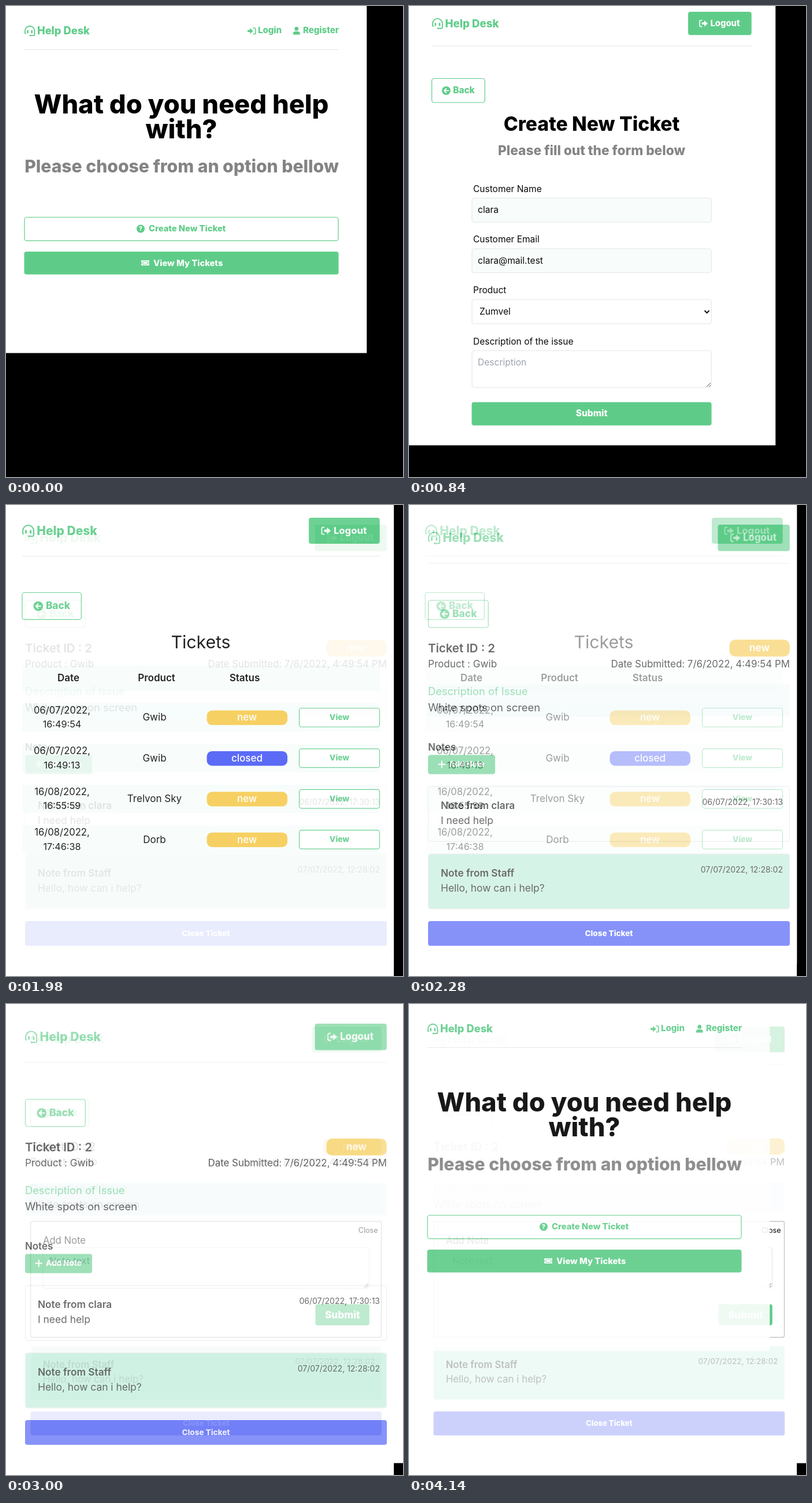
An HTML page for the animation above (4.2 s loop, 687 px wide and 815 px high).

```html
<!DOCTYPE html>
<html lang="en">
<head>
<meta charset="utf-8">
<title>Help Desk</title>
<style>
html, body { margin: 0; width: 100%; height: 100%; overflow: hidden; background: #000; }
#stage { display: block; font-family: Inter, sans-serif; font-optical-sizing: none; }
</style>
</head>
<body>
<svg id="stage" width="687" height="815" viewBox="0 0 687 815"></svg>
<script>
const GREEN = '#5ecc88', BLUE = '#374bf5', YELLOW = '#f6cb50', INK = '#0a0a0a';
const GREY = '#848484', LINE = '#e4e6e8', MINT = '#f8fdfc', HINT = '#9ca3af';
const BOLD = 800, SEMI = 600;

const text = (s, x, y, size, weight = 400, fill = INK, anchor = 'start') =>
  `<text x="${x}" y="${y}" font-size="${size}" font-weight="${weight}" fill="${fill}" text-anchor="${anchor}">${s}</text>`;
const centred = (s, x, y, size, weight, fill) => text(s, x, y, size, weight, fill, 'middle');
const box = (x, y, w, h, fill, stroke = 'none', r = 4, line = 1.2) =>
  `<rect x="${x}" y="${y}" width="${w}" height="${h}" rx="${r}" fill="${fill}" stroke="${stroke}" stroke-width="${line}"/>`;
const rule = (x, y, w) => box(x, y, w, 1, LINE, 'none', 0);
const grip = (x, y) =>
  `<path d="M${x - 7} ${y}l7-7M${x - 3} ${y}l3-3" stroke="#555" fill="none"/>`;

// Icons live in a 16 unit square; c is the colour, b the colour behind.
const ICONS = {
  headset: c => `<g fill="none" stroke="${c}" stroke-width="1.6"><path d="M2.4 12H1.6Q.8 12 .8 11V8a7.2 7.2 0 0 1 14.4 0v5.4q0 1.8-1.8 1.8H9"/>
    <path d="M4.9 7v4.6M11.1 7v4.6" stroke-width="2.2"/></g><circle cx="8.7" cy="15.1" r="1.2" fill="${c}"/>`,
  login: c => `<path d="M0 6h4.5V2.4L10.5 8l-6 5.6V10H0z" fill="${c}"/>
    <path d="M10.5 2.2h2.6q2 0 2 2v7.6q0 2-2 2h-2.6" fill="none" stroke="${c}" stroke-width="1.8"/>`,
  logout: c => `<path d="M5 6h4.5V2.4L16 8l-6.5 5.6V10H5z" fill="${c}"/>
    <path d="M5.5 2.2H3q-2 0-2 2v7.6q0 2 2 2h2.5" fill="none" stroke="${c}" stroke-width="1.8"/>`,
  user: c => `<circle cx="8" cy="4" r="4" fill="${c}"/><path d="M1 16v-2a4.5 4.5 0 0 1 4.5-4.5h5A4.5 4.5 0 0 1 15 14v2z" fill="${c}"/>`,
  help: (c, b) => `<circle cx="8" cy="8" r="8" fill="${c}"/>` + centred('?', 8, 12.4, 12.5, BOLD, b),
  ticket: (c, b) => box(0, 2.8, 16, 10.4, c, 'none', 1.4) + box(3.2, 5.2, 9.6, 5.6, c, b, .5, 1) +
    `<circle cx="0" cy="8" r="1.4" fill="${b}"/><circle cx="16" cy="8" r="1.4" fill="${b}"/>`,
  back: (c, b) => `<circle cx="8" cy="8" r="8" fill="${c}"/>
    <path d="M13 8H4.5M8.4 3.8L4.2 8l4.2 4.2" fill="none" stroke="${b}" stroke-width="2"/>`,
  plus: c => `<path d="M8 1v14M1 8h14" stroke="${c}" stroke-width="2.6" stroke-linecap="round"/>`
};
const icon = (name, x, y, size, color = GREEN, behind = '#fff') =>
  `<g transform="translate(${x} ${y}) scale(${size / 16})">${ICONS[name](color, behind)}</g>`;

const logo = (x, base, size) =>
  icon('headset', x, base - size * .83, size) + text('Help Desk', x + size * 1.2, base, size, BOLD, GREEN);
const logout = (x, y, w, h) => box(x, y, w, h, GREEN) +
  icon('logout', x + w * .174, y + h * .5 - w * .068, w * .137, '#fff') +
  text('Logout', x + w * .35, y + h * .615, w / 7.4, BOLD, '#fff');
const back = (x, y, w, h) => box(x, y, w, h, '#fff', GREEN) +
  icon('back', x + w * .19, y + h * .5 - w * .08, w * .163) +
  text('Back', x + w * .4, y + h * .61, w * .168, BOLD, GREEN);

function home() {
  return logo(32, 49, 18.3) +
    icon('login', 418, 36, 14.5) + text('Login', 436, 47.2, 15, BOLD, GREEN) +
    icon('user', 496, 36, 13.5) + text('Register', 514, 47.2, 15, BOLD, GREEN) +
    rule(32, 75, 544) +
    centred('What do you need help', 303.5, 186, 45.2, BOLD, '#000') +
    centred('with?', 303.5, 229, 45.2, BOLD, '#000') +
    centred('Please choose from an option bellow', 304, 288, 30.1, BOLD, GREY) +
    box(32, 365.5, 543, 40.7, '#fff', GREEN) +
    icon('help', 226, 378.5, 14) + text('Create New Ticket', 247, 390.3, 14.7, BOLD, GREEN) +
    box(31.5, 425, 544, 39.6, GREEN) +
    icon('ticket', 234, 437.5, 14, '#fff', GREEN) + text('View My Tickets', 255, 449.5, 14.7, BOLD, '#fff');
}

function form() {
  const field = (label, value, y, h, fill = '#fff', indent = 119, color = INK) =>
    text(label, 111, y - 11, 15.5) + box(109, y, 414.2, h, fill, LINE) + text(value, indent, y + 25.8, 15.6, 400, color);
  return logo(40, 36.5, 18.7) + logout(483, 10, 109.7, 40.3) + rule(40, 68.5, 553) +
    back(39.5, 125.5, 91.7, 41.5) +
    centred('Create New Ticket', 316, 215.5, 33.6, BOLD, '#000') +
    centred('Please fill out the form below', 316, 258, 22.7, BOLD, GREY) +
    field('Customer Name', 'clara', 332.5, 41.5, MINT) +
    field('Customer Email', 'clara@mail.test', 420, 41.5, MINT) +
    field('Product', 'Zumvel', 508, 42, '#fff', 122) +
    '<path d="M511.5 527l4 4 4-4" fill="none" stroke="#111" stroke-width="2"/>' +
    field('Description of the issue', 'Description', 596.5, 63.5, '#fff', 119, HINT) + grip(522, 659) +
    box(108.5, 685.5, 415, 40.3, GREEN) + centred('Submit', 316, 710.3, 15.5, BOLD, '#fff');
}

function list() {
  const row = ([day, time, product, status], i) => {
    const y = 343.3 + i * 70.4;
    return box(28, y, 619, 49, MINT, 'none', 0) +
      centred(day + ',', 97, y + 17.5, 16.6) + centred(time, 97, y + 42, 16.2) +
      centred(product, 257, y + 30, 17) +
      box(347.5, y + 12.2, 139.5, 25.3, status == 'new' ? YELLOW : '#485af5', 'none', 9) +
      centred(status, 417, y + 30, 17, 500, '#fff') +
      box(507.5, y + 8.2, 139, 32.5, '#fff', GREEN) + centred('View', 577, y + 28.7, 13.7, BOLD, GREEN);
  };
  return logo(28, 51.5, 21) + logout(524, 22, 122.7, 45) + rule(28, 88, 619) +
    back(28, 151.5, 102.3, 46.7) + centred('Tickets', 337, 248, 30.2) +
    box(28, 278, 619, 44, MINT, 'none', 0) +
    centred('Date', 108, 304.5, 17, SEMI) + centred('Product', 260.5, 304.5, 17, SEMI) + centred('Status', 413, 304.5, 17, SEMI) +
    [['06/07/2022', '16:49:54', 'Gwib', 'new'],
     ['06/07/2022', '16:49:13', 'Gwib', 'closed'],
     ['16/08/2022', '16:55:59', 'Trelvon Sky', 'new'],
     ['16/08/2022', '17:46:38', 'Dorb', 'new']].map(row).join('');
}

function ticket() {
  const note = (author, body, date, y, fill) =>
    box(33.5, y, 625, 95, fill, LINE) + text('Note from ' + author, 55, y + 39, 17.2, SEMI) +
    text(body, 55, y + 65, 17.4) + text(date, 647, y + 31.7, 14, 400, INK, 'end');
  return logo(33, 64, 21.2) + logout(534.5, 34, 124.3, 45.8) + rule(33, 100.5, 626) +
    back(33.5, 165, 103.7, 47) +
    text('Ticket ID : 2', 33, 255, 20.4, SEMI) + text('Product : Gwib', 33, 281.3, 17.1) +
    box(554.5, 233, 104.3, 29.3, YELLOW, 'none', 10) + centred('new', 606.5, 253.2, 17.2, SEMI, '#fff') +
    text('Date Submitted: 7/6/2022, 4:49:54 PM', 659, 281.3, 16.9, 400, INK, 'end') +
    box(33, 310.5, 626, 55.5, '#f6fbfc', 'none', 0) +
    text('Description of Issue', 33, 329, 18.3, 400, GREEN) + text('White spots on screen', 33, 357, 18.4) +
    text('Notes', 33, 425, 16.9, SEMI) +
    box(33, 432.5, 116, 33.3, GREEN) + icon('plus', 50.5, 442.5, 12.5, '#fff') + text('Add Note', 69, 453.3, 13.5, BOLD, '#fff') +
    note('clara', 'I need help', '06/07/2022, 17:30:13', 487.2, '#fff') +
    note('Staff', 'Hello, how can i help?', '07/07/2022, 12:28:02', 603.8, '#bbecd8') +
    box(33, 720, 626, 42.7, BLUE) + centred('Close Ticket', 346, 746, 13.5, BOLD, '#fff');
}

function dialog() {
  return `<g opacity=".25" transform="translate(10.3 6) scale(.971)">${ticket()}</g>` +
    box(42.5, 376.3, 607, 200.5, '#fff', '#c6c6c6', 3, 1.4) +
    text('Close', 643.5, 395.5, 12.6, 400, INK, 'end') + text('Add Note', 64, 414.7, 16.6) +
    box(63.8, 421.5, 564.7, 70.3, '#fff', LINE) + text('Note text', 75, 450, 16.3, 400, HINT) + grip(627, 490.5) +
    box(535.5, 519.5, 93.3, 36.5, GREEN) + centred('Submit', 582.3, 543.5, 17.2, BOLD, '#fff');
}

// Pages pile up; the first one returns on top to close the loop.
const pages = [
  [home, 624.5, 600.7], [form, 634.5, 760.4], [list, 671.4, 815], [ticket, 687, 794.6], [dialog, 687, 794.6], [home, 624.5, 600.7]
].map(([draw, w, h]) => ({ draw, w, h }));
const stage = document.getElementById('stage');
stage.innerHTML = pages.map(p =>
  `<svg width="${p.w}" height="${p.h}" overflow="hidden"><rect width="${p.w}" height="${p.h}" fill="#fff"/>${p.draw()}</svg>`).join('');
pages.forEach((p, i) => p.el = stage.children[i]);

const PERIOD = 840, HOLD = 300, STEP = 60;

function render(now) {
  const t = now % (PERIOD * 5), current = Math.floor(t / PERIOD), phase = t % PERIOD;
  const fade = phase < HOLD ? 0 : (Math.floor((phase - HOLD) / STEP) + 1) / 10;
  pages.forEach((p, i) => {
    const entering = i == current + 1, below = pages[current];
    p.el.setAttribute('opacity', i <= current ? 1 : entering ? fade : 0);
    // A fade only covers the area both pages share.
    p.el.setAttribute('width', entering ? Math.min(p.w, below.w) : p.w);
    p.el.setAttribute('height', entering ? Math.min(p.h, below.h) : p.h);
  });
}

const start = performance.now();
(function tick() {
  render(performance.now() - start);
  requestAnimationFrame(tick);
})();
</script>
</body>
</html>
```
